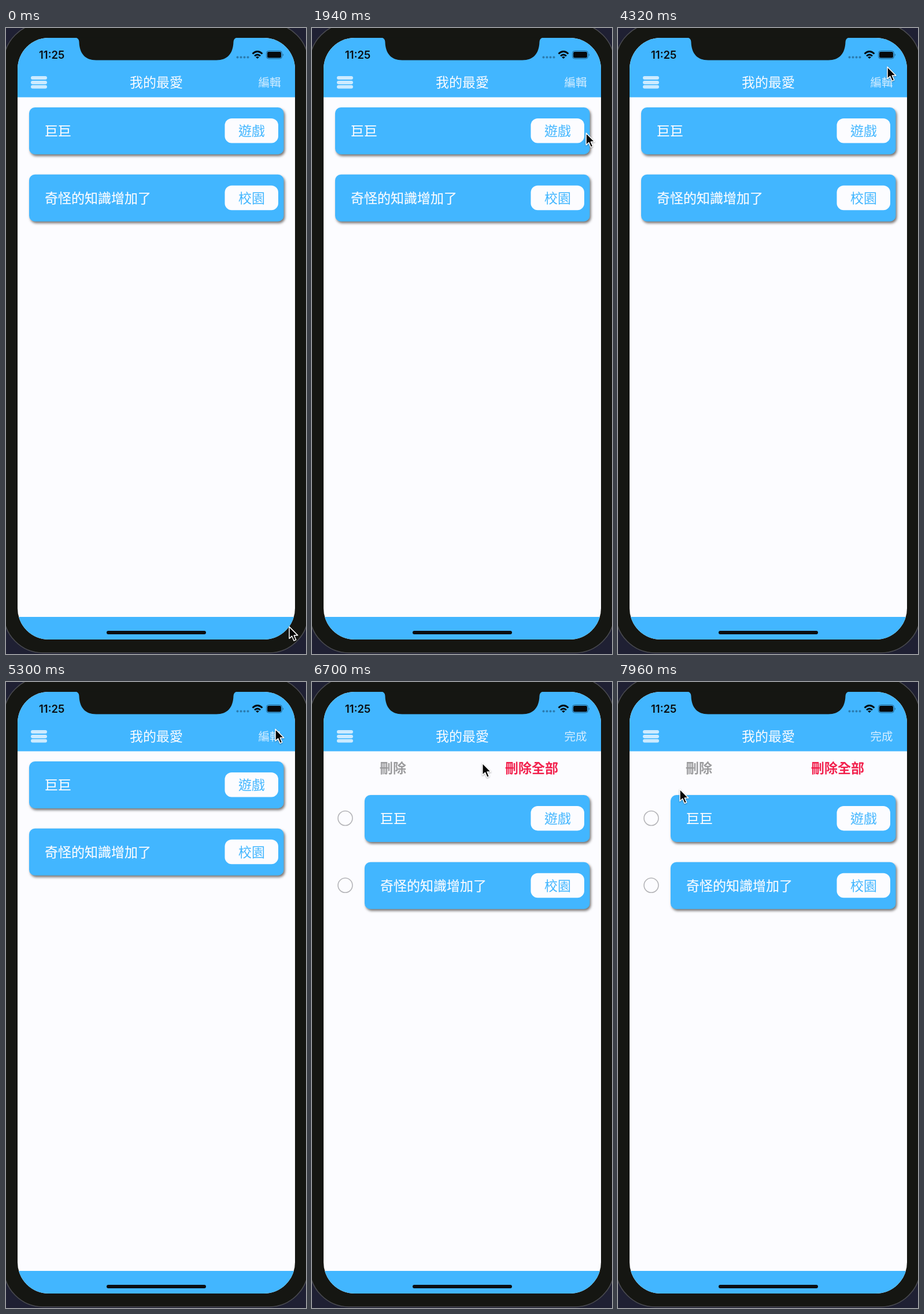
An HTML page that plays this animation: 519 by 1080 pixels, repeating every 8 s.

```html
<!DOCTYPE html>
<html lang="zh-Hant">
<head>
<meta charset="utf-8">
<title>我的最愛</title>
<style>
html, body { margin: 0; width: 100%; height: 100%; overflow: hidden; background: #1f2033; }
svg { display: block; width: 519px; height: 1080px; }
text { font: 400 23px "Noto Sans CJK TC", "Noto Sans CJK", sans-serif; fill: #fcfcff; }
.light { font-weight: 300; }
.name { font-weight: 500; stroke: #fcfcff; stroke-width: .2; }
.tag { fill: #42b6ff; text-anchor: middle; }
.bold { font-weight: 700; }
.clock { font: 600 18.5px Inter, sans-serif; fill: #0a0c10; }
.blue { fill: #42b6ff; }
.paper { fill: #fcfcff; }
.card { fill: #42b6ff; filter: drop-shadow(2px 3px 2px rgba(30, 25, 20, .6)); }
</style>
</head>
<body>
<svg viewBox="0 0 519 1080">
  <defs>
    <clipPath id="screen"><rect x="20" y="17" width="480" height="1038" rx="54"/></clipPath>
  </defs>
  <rect x="-4" y="-8" width="527" height="1086" rx="68" fill="#151612" stroke="#4a4b50" stroke-width="1.5"/>

  <g clip-path="url(#screen)">
    <rect class="paper" x="20" y="17" width="480" height="1038"/>
    <rect class="blue" x="20" y="17" width="480" height="102.5"/>
    <rect class="blue" x="20" y="1016" width="480" height="40"/>
  </g>
  <path d="M120 16.5Q126 17 126.500 24C127 44 137 55.500 156 55.500H364C383 55.500 393 44 393.500 24Q394 17 400 16.500Z" fill="#151612"/>
  <rect x="174" y="1040" width="172" height="6" rx="3" fill="#0b0d10"/>

  <text class="clock" x="57" y="52.500">11:25</text>
  <g fill="#2b7cb0">
    <circle cx="400.500" cy="50.500" r="2"/><circle cx="406.500" cy="50.500" r="2"/>
    <circle cx="412.500" cy="50.500" r="2"/><circle cx="418.500" cy="50.500" r="2"/>
  </g>
  <g fill="none" stroke="#06090c" stroke-width="2.800">
    <path d="M426.500 44.500Q435 36.500 443.500 44.500"/>
    <path d="M430 48.200Q435 43.800 440 48.200"/>
    <path d="M432 50.300Q435 48.100 438 50.300L435 53Z" fill="#06090c" stroke="none"/>
  </g>
  <rect x="450.500" y="39.500" width="27" height="13.500" rx="4" fill="none" stroke="#1f5f88"/>
  <rect x="452" y="41" width="24" height="10.500" rx="2.500" fill="#06090c"/>
  <path d="M479 44v4.500q2-2.200 0-4.500" fill="#1f5f88"/>

  <g fill="#cdebff">
    <rect x="43" y="83" width="28" height="6" rx="3"/>
    <rect x="43" y="91" width="28" height="6" rx="3"/>
    <rect x="43" y="98.500" width="28" height="6" rx="3"/>
  </g>
  <text class="light" x="214" y="101.500">我的最愛</text>
  <text class="light" id="mode" x="436.500" y="101" style="font-size:19.500px">編輯</text>

  <g id="tools">
    <text class="bold" x="117" y="156.500" style="fill:#9b9b9d">刪除</text>
    <text class="bold" x="334" y="156.500" style="fill:#f2224e">刪除全部</text>
  </g>
  <g id="list"></g>

  <path id="cursor" d="M0 0V20.500L4.700 16.300L8.100 24.300L11.700 22.800L8.300 15H14.800Z"
    fill="#050505" stroke="#fff" stroke-width="1.500" stroke-linejoin="round"
    style="filter:drop-shadow(0 1px 1px rgba(0,0,0,.35))"/>
</svg>
<script>
const LOOP = 8000, SWITCH = 5700;
const $ = id => document.getElementById(id);
const rows = [['巨巨', '遊戲'], ['奇怪的知識增加了', '校園']];

// time, x, y of the pointer tip
const path = [
  [0, 490, 1033], [100, 490, 1020], [820, 482, 405], [1200, 481, 294], [1700, 480, 235],
  [2450, 462, 68], [2880, 462, 66], [3500, 466, 67], [4320, 466, 67],
  [5120, 466, 81], [5720, 466, 82], [6000, 462, 84], [6700, 295, 140],
  [7500, 130, 178], [7960, 107, 185], [8000, 107, 185]
];
// time, opacity of the edit button
const fade = [[0, .8], [5480, .8], [5620, .13], [5720, .13], [5960, .8], [8000, .8]];

function at(table, t, col) {
  let i = 1;
  while (i < table.length - 1 && table[i][0] < t) i++;
  const a = table[i - 1], b = table[i];
  return a[col] + (b[col] - a[col]) * (t - a[0]) / (b[0] - a[0]);
}

function listMarkup(editing) {
  const left = editing ? 91 : 40, top = editing ? 195 : 137;
  return rows.map(([name, tag], i) => {
    const y = top + i * 115.8;
    const ring = `<circle cx="57.5" cy="${y + 40}" r="12.5" fill="none" stroke="#b4b4b8" stroke-width="1.6"/>`;
    return (editing ? ring : '') +
      `<rect class="card" x="${left}" y="${y}" width="${480.5 - left}" height="81" rx="10"/>
      <text class="name" x="${left + 27}" y="${y + 49}">${name}</text>
      <rect class="paper" x="378.5" y="${y + 19}" width="92.5" height="42.5" rx="12"/>
      <text class="tag light" x="425" y="${y + 49}">${tag}</text>`;
  }).join('');
}

let shown = null;
function setMode(editing) {
  if (shown === editing) return;
  shown = editing;
  $('list').innerHTML = listMarkup(editing);
  $('tools').style.display = editing ? '' : 'none';
  $('mode').textContent = editing ? '完成' : '編輯';
}

function draw(now) {
  const t = now % LOOP;
  setMode(t >= SWITCH);
  $('mode').style.opacity = at(fade, t, 1);
  $('cursor').setAttribute('transform', `translate(${at(path, t, 1)} ${at(path, t, 2)})`);
}

const start = performance.now();
function tick() {
  draw(performance.now() - start);
  requestAnimationFrame(tick);
}
tick();
</script>
</body>
</html>
```
